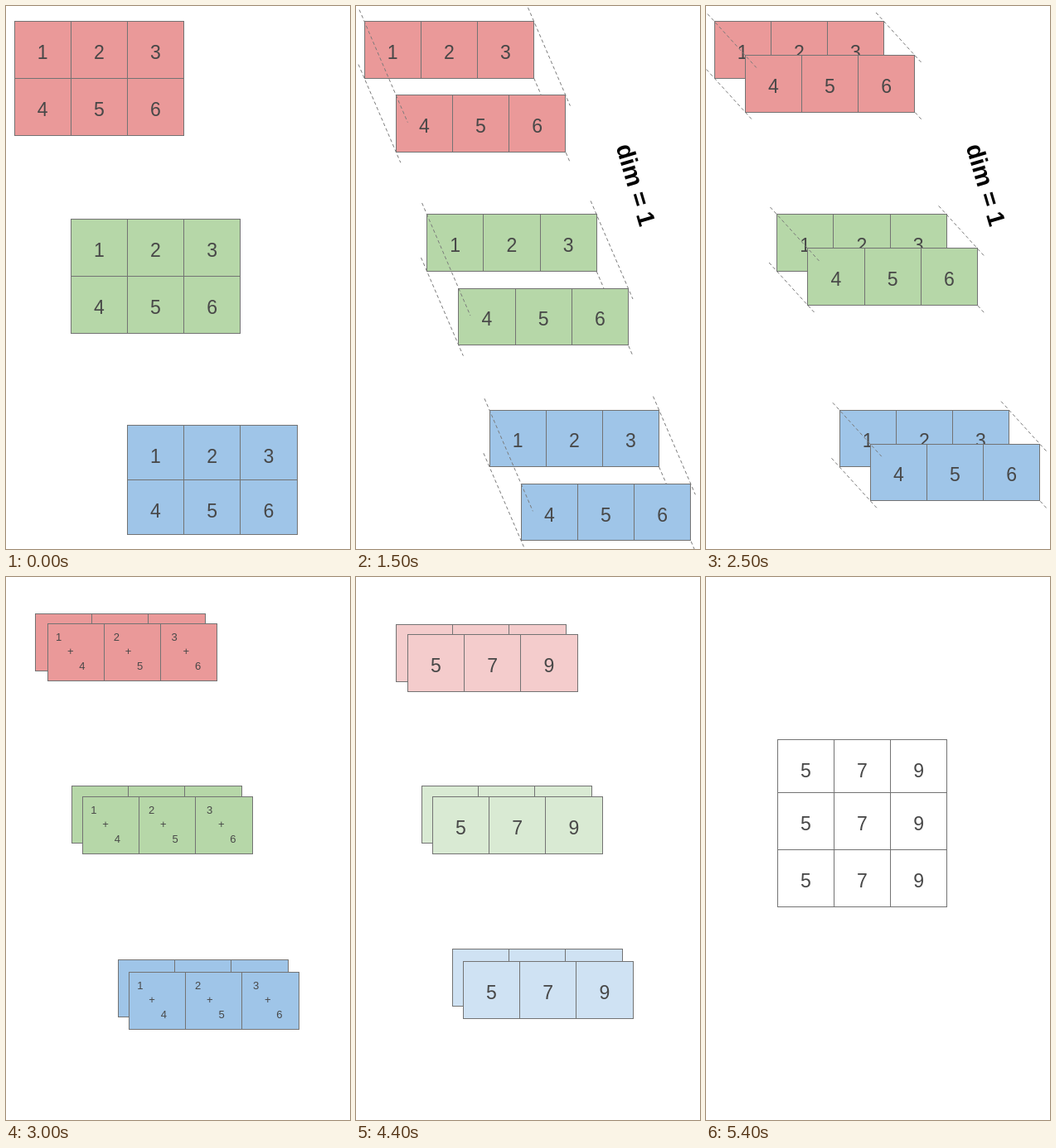
An HTML page that plays this animation: 415 px wide and 656 px high, repeating every 6600 ms.

```html
<!DOCTYPE html>
<html lang="en">
<head>
<meta charset="utf-8">
<title>Sum along dim 1</title>
<style>
  html, body { margin: 0; width: 100%; height: 100%; overflow: hidden; background: #fff; }
  svg { display: block; width: 100vw; height: 100vh; }
  text { font-family: Arial, "Liberation Sans", sans-serif; text-anchor: middle; fill: #484848; }
  .num { font-size: 23px; }
  .small { font-size: 13px; }
  .axis { font-size: 29.3px; font-weight: bold; fill: #000; }
  rect { stroke: #737373; stroke-width: 1; }
  .guide { stroke: #7a7a7a; stroke-width: 1; stroke-dasharray: 4 3; }
  .scene { visibility: hidden; }
  .scene.on { visibility: visible; }
</style>
</head>
<body>
<svg id="stage" viewBox="0 0 415 656"></svg>
<script>
const NS = 'http://www.w3.org/2000/svg';
const stage = document.getElementById('stage');
const CELL_W = 68.2, CELL_H = 68.6, LOOP = 6600;
const STRONG = ['#ea9999', '#b6d7a8', '#9fc5e8'];
const PALE = ['#f4cccc', '#d9ead3', '#cfe2f3'];
const TOP = [1, 2, 3], BOTTOM = [4, 5, 6], SUMS = [5, 7, 9], BLANK = ['', '', ''];

function add(parent, tag, attrs, content) {
  const el = document.createElementNS(NS, tag);
  for (const key in attrs) el.setAttribute(key, attrs[key]);
  if (content !== undefined) el.textContent = content;
  parent.appendChild(el);
  return el;
}

const snap = v => Math.floor(v) + 0.5;

function label(g, x, y, value, cls = 'num') {
  add(g, 'text', { x, y, class: cls }, value);
}

function row(g, x, y, fill, values, h = CELL_H) {
  const top = snap(y), height = snap(y + h) - top;
  values.forEach((value, i) => {
    const left = snap(x + i * CELL_W);
    add(g, 'rect', { x: left, y: top, width: snap(x + (i + 1) * CELL_W) - left, height, fill });
    if (value !== '') label(g, x + (i + 0.5) * CELL_W, y + 45.2, value);
  });
}

// Dashed line along (dx, dy) from a corner, extended by up and down in y.
function guide(g, x, y, dx, dy, up, down) {
  const k = dx / dy;
  add(g, 'line', {
    class: 'guide',
    x1: x - up * k, y1: y - up,
    x2: x + dx + down * k, y2: y + dy + down
  });
}

// Two rows per tensor, the lower one shifted by (dx, dy).
function split(g, places, dx, dy) {
  places.forEach(([x, y], i) => {
    row(g, x, y, STRONG[i], TOP);
    row(g, x + dx, y + dy, STRONG[i], BOTTOM);
  });
}

const ANCHORS = [[10, 18.5], [85.6, 251.95], [161, 488.2]];

function projected(dx, dy) {
  return g => {
    const up = 5.4 + 0.125 * dy, down = 5.6 + 0.083 * dy;
    const right = 3 * CELL_W;
    ANCHORS.forEach(([x, y]) => guide(g, x + right, y + CELL_H, dx, dy, 0, down));
    split(g, ANCHORS, dx, dy);
    ANCHORS.forEach(([x, y]) => {
      guide(g, x, y, dx, dy, 4.7 + 0.104 * dy, 0.375 * dy - 0.4);
      guide(g, x, y + CELL_H, dx, dy, up, down);
      guide(g, x + right, y, dx, dy, up, down);
    });
    add(g, 'text', { class: 'axis', y: 10, transform: 'translate(337.5 216) rotate(73.5)' }, 'dim = 1');
  };
}

function stacked(g, places, fills, values) {
  places.forEach(([x, y, dx, dy], i) => {
    row(g, x, y, fills[i], BLANK);
    row(g, x + dx, y + dy, fills[i], values);
  });
}

const APART = [[35.4, 44.5, 14.6, 12], [79.4, 252.5, 13, 13], [135.4, 462.5, 13, 15]];
const CLOSER = [[48.4, 57.5, 14, 12], APART[1], [116.4, 449.5, 13, 15]];

function whole(g) {
  [[10, 18.4, 69], [78.2, 257.6, 69], [146.4, 506.6, 66]].forEach(([x, y, h], i) => {
    row(g, x, y, STRONG[i], TOP, h);
    row(g, x, y + h, STRONG[i], BOTTOM, h);
  });
}

function adding(g) {
  stacked(g, APART, STRONG, BLANK);
  APART.forEach(([x, y, dx, dy]) => TOP.forEach((n, i) => {
    const cx = x + dx + 13.5 + i * 69.8, cy = y + dy + 20.2;
    [n, '+', n + 3].forEach((s, j) => label(g, cx + j * 14.2, cy + j * 17.5, s, 'small'));
  }));
}

const scenes = [
  [0, whole],
  [1000, g => split(g, [[10, 18.5], [82, 256.5], [156.4, 490.5]], 11.5, 81)],
  [1500, projected(38.2, 89.1)],
  [2000, projected(37.8, 65)],
  [2500, projected(37.2, 41)],
  [3000, adding],
  [3700, g => stacked(g, APART, PALE, SUMS)],
  [4400, g => stacked(g, CLOSER, PALE, SUMS)],
  [4900, g => [134.4, 261.4, 393.4].forEach((y, i) => row(g, 86.2, y, PALE[i], SUMS))],
  [5400, g => [[196.5, 64], [260.5, 69], [329.5, 69]].forEach(([y, h]) => row(g, 86.2, y, '#fff', SUMS, h))]
].map(([start, draw]) => {
  const g = add(stage, 'g', { class: 'scene' });
  draw(g);
  return { start, g };
});

const origin = performance.now();
let current;

function tick() {
  const t = (performance.now() - origin) % LOOP;
  const next = scenes.filter(s => s.start <= t).pop();
  if (next !== current) {
    if (current) current.g.classList.remove('on');
    next.g.classList.add('on');
    current = next;
  }
  requestAnimationFrame(tick);
}
tick();
</script>
</body>
</html>
```
